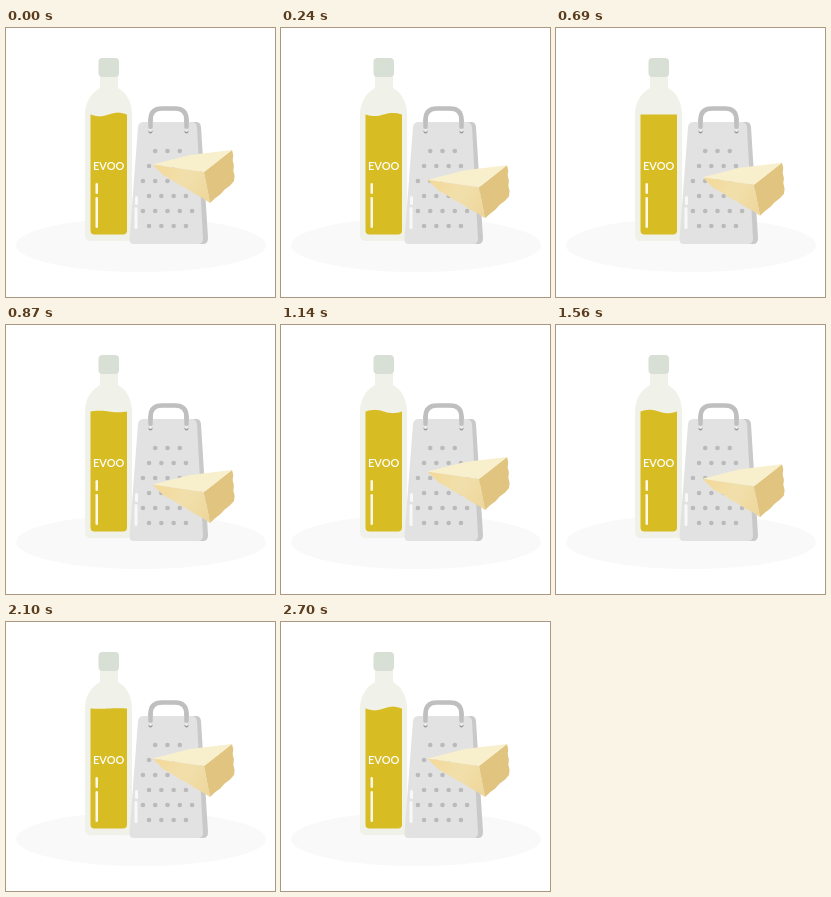
Write an HTML page with a canvas that moves like this. It is 269x269 px and loops after 2730 ms.

```html
<!DOCTYPE html>
<html lang="en">
<head>
<meta charset="utf-8">
<title>Oil, grater and cheese</title>
<style>
  html, body { margin: 0; width: 100%; height: 100%; overflow: hidden; background: #fff; }
  canvas { display: block; width: 269px; height: 269px; }
</style>
</head>
<body>
<canvas id="stage" width="269" height="269"></canvas>
<script>
const ctx = document.getElementById('stage').getContext('2d');
const TAU = Math.PI * 2;
const LOOP = 2730;
const STEP = 30;
const STROKES = { start: 85, period: 221, count: 7, depth: 23.5 };

function polygon(color, points) {
  ctx.fillStyle = color;
  ctx.beginPath();
  points.forEach(([x, y]) => ctx.lineTo(x, y));
  ctx.closePath();
  ctx.fill();
}

function box(color, x, y, w, h, r) {
  ctx.fillStyle = color;
  ctx.beginPath();
  ctx.roundRect(x, y, w, h, r);
  ctx.fill();
}

function dot(color, x, y, r) {
  ctx.fillStyle = color;
  ctx.beginPath();
  ctx.arc(x, y, r, 0, TAU);
  ctx.fill();
}

function shape(color, path) {
  ctx.fillStyle = color;
  ctx.fill(new Path2D(path));
}

function drawGround() {
  ctx.fillStyle = '#f9f9f9';
  ctx.beginPath();
  ctx.ellipse(135, 217, 125, 27, 0, 0, TAU);
  ctx.fill();
}

function drawBottle(t) {
  shape('#f0f1e8', 'M94 46H112V60C119 64 126 72 126 87V207Q126 213 120 213H85Q79 213 79 207V87C79 72 87 64 94 60Z');
  box('#d8dfd5', 92.5, 30, 20.5, 19, 4);

  // The surface sloshes as a standing wave, still at both walls.
  const left = 84.5, right = 121, level = 86.5, bottom = 206.5;
  const swing = 1.9 * Math.cos(t / LOOP * TAU);
  ctx.fillStyle = '#d8bc24';
  ctx.beginPath();
  for (let u = 0; u <= 1; u += 1 / 32) {
    ctx.lineTo(left + u * (right - left), level + swing * Math.sin(u * TAU));
  }
  ctx.arcTo(right, bottom, left, bottom, 4);
  ctx.arcTo(left, bottom, left, level, 4);
  ctx.fill();

  ctx.fillStyle = '#fff';
  ctx.font = '600 11px Lato, sans-serif';
  ctx.textAlign = 'center';
  ctx.fillText('EVOO', 102.7, 142);
  box('#fbf8e9', 89.5, 155, 2.5, 11, 1.25);
  box('#fbf8e9', 89.5, 169, 2.5, 31, 1.25);
}

function drawGrater() {
  ctx.strokeStyle = '#bfbfbf';
  ctx.lineWidth = 4.5;
  ctx.lineCap = 'round';
  ctx.stroke(new Path2D('M144.5 101V92Q144.5 80.5 156 80.5H169Q180.5 80.5 180.5 92V101'));

  shape('#c9c9c9', 'M142 94H190Q194.500 94 195 99L202 210Q202 216 197 216H140Z');
  shape('#e2e2e2', 'M138 94H186Q190 94 191 99L197 211Q197 216 192 216H128Q123 216 123.500 211L132 99Q132.500 94 138 94Z');

  for (const x of [144.5, 180.5]) {
    box('#bfbfbf', x - 2.25, 90, 4.5, 11, 2);
    dot('#999', x, 103.5, 2);
    dot('#ececec', x, 102.3, 1.6);
  }

  for (let row = 0; row < 6; row++) {
    const count = row ? 5 - row % 2 : 3;
    for (let i = 0; i < count; i++) {
      dot('#bababa', 161.5 + (i - (count - 1) / 2) * 12.3, 123 + row * 15, 2.3);
    }
  }
  box('#f8f8f8', 129, 168, 3, 9, 1.5);
  box('#f8f8f8', 128.5, 179, 3, 22, 1.5);
}

function cheeseDrop(t) {
  const phase = (t - STROKES.start) / STROKES.period;
  if (phase < 0 || phase > STROKES.count) return 0;
  return STROKES.depth * (1 - Math.cos(phase * TAU)) / 2;
}

// Points along a line that zigzag slightly, like crumbly cheese.
function crumble([x0, y0], [x1, y1], count) {
  return Array.from({ length: count }, (_, i) => {
    const u = i / count;
    return [x0 + (x1 - x0) * u + (i % 2 ? 0.9 : 0), y0 + (y1 - y0) * u];
  });
}

function drawCheese(t) {
  const tip = [146.5, 136.5], crest = [184, 127], back = [226, 122];
  const ridge = [198, 144], side = [228, 153], foot = [204, 175];
  const face = ctx.createLinearGradient(...tip, ...foot);
  face.addColorStop(0, '#f4d998');
  face.addColorStop(0.5, '#f1dfab');
  face.addColorStop(1, '#eed69a');

  ctx.save();
  ctx.translate(0, cheeseDrop(t));
  polygon(face, [tip, ridge, ...crumble(foot, [150, 143], 7)]);
  polygon('#e0c47f', [ridge, ...crumble(back, side, 6), ...crumble(side, foot, 5), foot]);
  polygon('#f8efcd', [tip, crest, back, ridge]);
  ctx.restore();
}

function draw(now) {
  const t = Math.floor(now % LOOP / STEP) * STEP;
  ctx.fillStyle = '#fff';
  ctx.fillRect(0, 0, 269, 269);
  drawGround();
  drawBottle(t);
  drawGrater();
  drawCheese(t);
}

let origin;
function tick(now) {
  origin ??= now;
  draw(now - origin);
  requestAnimationFrame(tick);
}
draw(0);
requestAnimationFrame(tick);
</script>
</body>
</html>
```
